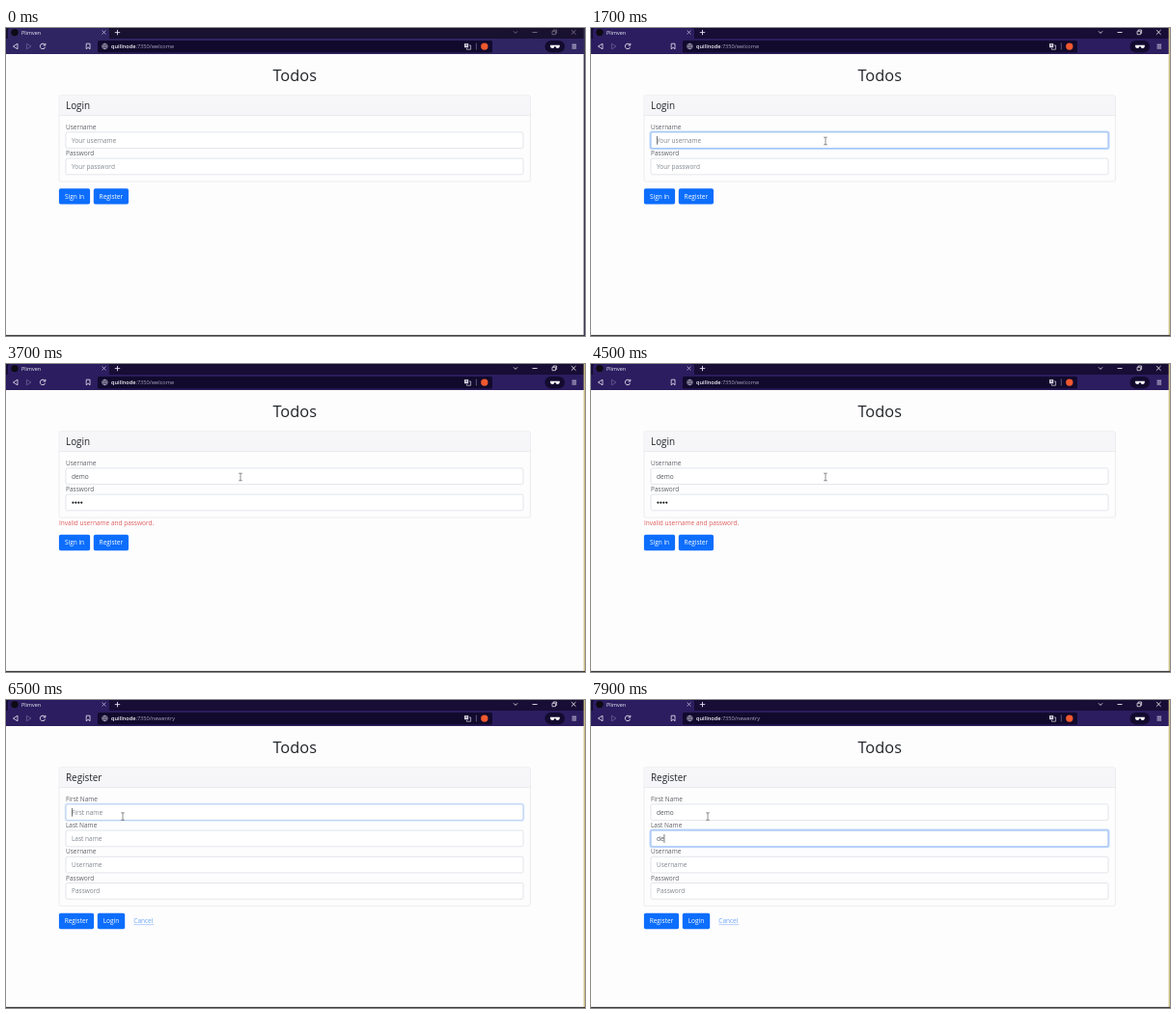
Write an HTML page that moves like this. It is 600 by 319 pixels and loops after 8000 ms.

```html
<!DOCTYPE html>
<html lang="en">
<head>
<meta charset="utf-8">
<title>Sign in and register</title>
<style>
html, body { margin: 0; width: 100%; height: 100%; overflow: hidden; background: #fefdfe; }
svg { display: block; width: 600px; height: 319px; }
text { font-family: "Open Sans", "Noto Sans", sans-serif; font-size: 6.5px; white-space: pre; }
</style>
</head>
<body>
<svg id="stage" viewBox="0 0 600 319" width="600" height="319"></svg>
<script>
const LOOP = 8000, STEP = 100;
const stage = document.getElementById('stage');

function el(parent, tag, attrs, content) {
  const node = document.createElementNS('http://www.w3.org/2000/svg', tag);
  set(node, attrs);
  if (content !== undefined) node.textContent = content;
  parent.appendChild(node);
  return node;
}
function set(node, attrs) {
  for (const k in attrs) node.setAttribute(k, attrs[k]);
}
const rect = (p, x, y, width, height, fill, more) => el(p, 'rect', { x, y, width, height, fill, ...more });
const label = (p, x, y, str, fill, more) => el(p, 'text', { x, y, fill, ...more }, str);
const line = (p, d, stroke, w = 0.8, more) =>
  el(p, 'path', { d, stroke, 'stroke-width': w, fill: 'none', ...more });
const show = (node, on) => node.setAttribute('visibility', on ? 'visible' : 'hidden');
const clamp = v => Math.max(0, Math.min(1, v));

// Browser window
rect(stage, 0, 0, 600, 319, '#fefdfe');
const titleBar = rect(stage, 0, 0, 600, 12, '#180f33');
const tab = el(stage, 'path', { d: 'M2 12V2Q2 0 4 0H105Q107 0 107 2V12Z' });
const toolbar = rect(stage, 0, 11, 600, 16, '#2d2060');
el(stage, 'circle', { cx: 9, cy: 4.6, r: 3.7, fill: '#0d0b14' });
label(stage, 16, 6.6, 'Plimven', '#f1eff8', { style: 'font-size:5.4px;font-weight:500' });
line(stage, 'M99.6 2.6l3.8 3.8m0-3.8l-3.8 3.8', '#d8d4ea', 0.7);
line(stage, 'M115.5 1.9v5.4M112.8 4.6h5.4', '#e4e0f2', 0.9);

const controls = el(stage, 'g', {});
line(controls, 'M526 3.4l2 2 2-2', '#fff', 0.8);
line(controls, 'M545.5 4.5h5', '#fff', 0.8);
line(controls, 'M566 3.3h3.4v3.4H566zM567.2 3.2V2h3.4v3.4h-1', '#fff', 0.7);
line(controls, 'M585.9 2.1l4.6 4.6m0-4.6l-4.6 4.6', '#fff', 0.8);

line(stage, 'M12 16.2v5.6L7.4 19z', '#ece9f6', 0.8, { 'stroke-linejoin': 'round' });
line(stage, 'M21.4 16.2v5.6L26 19z', '#6b5f99', 0.8, { 'stroke-linejoin': 'round' });
line(stage, 'M40.2 17.3A2.7 2.7 0 1 0 40.6 19.8M40.8 15.8v2.2h-2.2', '#ece9f6', 0.9);
line(stage, 'M83.2 16.2h3.8v5.6l-1.9-1.6-1.9 1.6z', '#ece9f6', 0.8);

rect(stage, 95, 13, 409, 12.6, '#120a2d', { rx: 1.6 });
line(stage, 'M99.6 19a2.8 2.8 0 1 0 5.6 0a2.8 2.8 0 1 0-5.6 0h5.6M102.4 16.2q-2.4 2.8 0 5.6q2.4-2.8 0-5.6', '#cfcbdd', 0.6);
const address = label(stage, 109, 21.2, '', '#f4f2fa', { style: 'font-size:5.6px' });
el(address, 'tspan', { 'font-weight': 600 }, 'quillnode');
const path = el(address, 'tspan', { fill: '#aaa5bd' });

rect(stage, 475, 16, 4.2, 4.2, '#d9d6e4', { rx: 0.5 });
line(stage, 'M480 18h1.6v4.2h-4.2v-1.4', '#d9d6e4', 0.7);
line(stage, 'M476 17.2h2.2M477.1 17v2.2', '#2a2145', 0.5);
line(stage, 'M487.3 15.5v7', '#8d87a5', 0.6);
el(stage, 'circle', { cx: 495.8, cy: 19.1, r: 3.7, fill: '#f0582f' });
rect(stage, 558.5, 13, 20.5, 12.4, '#130b2e', { rx: 6.2 });
el(stage, 'path', { d: 'M564 17.8h9.8v1.1q-.3 2-2.2 2t-2.3-2h-.8q-.3 2-2.3 2t-2.2-2z', fill: '#fff' });
line(stage, 'M586.5 17.2h4.6M586.5 19.1h4.6M586.5 21h4.6', '#f1eff8', 0.8);

const rightEdge = rect(stage, 598.6, 0, 1.4, 319, '#3a3550');
rect(stage, 0, 317.9, 600, 1.1, '#3c3b3e');

label(stage, 299.2, 54.7, 'Todos', '#212529',
  { 'text-anchor': 'middle', style: 'font-size:16.4px;font-weight:500' });

// Form pages
const LEFT = 62, FIELD_W = 474, FIELD_H = 16.7, PITCH = 27.2;

function makeField(parent, i, name, hint, spec = {}) {
  const y = 107.9 + i * PITCH, base = y + 10.6;
  label(parent, LEFT, y - 2.9, name, '#5d6165');
  const ring = rect(parent, LEFT - 1.5, y - 1.5, FIELD_W + 3, FIELD_H + 3, '#c2dafd', { rx: 2.6 });
  rect(parent, LEFT, y, FIELD_W, FIELD_H, '#fff', { rx: 1.7, stroke: '#cfd4da', 'stroke-width': 0.6 });
  const edge = rect(parent, LEFT, y, FIELD_W, FIELD_H, 'none', { rx: 1.7, stroke: '#86b7fe', 'stroke-width': 0.7 });
  const hintText = label(parent, 68, base, hint, '#80868c');
  const value = label(parent, 68, base, '', '#50565c');
  const dots = spec.secret ? [0, 1, 2, 3].map(n =>
    el(parent, 'circle', { cx: 69.4 + n * 2.95, cy: y + 8.5, r: 1.1, fill: '#15181b' })) : null;
  const caret = rect(parent, 68, y + 4, 0.6, 8.8, '#222');
  const on = spec.on ?? Infinity, off = spec.off ?? Infinity, keys = spec.keys || [];

  function update(t) {
    const glow = clamp((t - on) / 150) - clamp((t - off) / 150);
    set(ring, { opacity: glow });
    set(edge, { opacity: clamp(glow * 2) });
    const pressed = keys.filter(k => k <= t), n = pressed.length;
    show(hintText, n === 0);
    let end = 68;
    if (dots) {
      dots.forEach((d, k) => show(d, k < n));
      end += n * 2.95;
    } else {
      value.textContent = 'demo'.slice(0, n);
      if (n) end += value.getComputedTextLength();
    }
    const since = t - (n ? pressed[n - 1] : on);
    set(caret, { x: end, opacity: t >= on && t < off && since % 1000 < 500 ? 1 : 0 });
  }
  return { update, hit: (x, py) => x >= LEFT && x <= LEFT + FIELD_W && py >= y && py <= y + FIELD_H };
}

function makeButton(parent, x, w, str) {
  const ring = rect(parent, x - 1.6, -1.6, w + 3.2, 19.6, '#9ec5fe', { rx: 3, opacity: 0 });
  const face = rect(parent, x, 0, w, 16.4, '#0d6efd', { rx: 1.8 });
  label(parent, x + w / 2, 10.6, str, '#fff', { 'text-anchor': 'middle', 'font-weight': 500 });
  return {
    hit: (px, py) => px >= x && px <= x + w && py >= 0 && py <= 16.4,
    update(hover, pressed) {
      set(face, { fill: hover ? '#0b5ed7' : '#0d6efd' });
      set(ring, { opacity: pressed ? 1 : 0 });
    }
  };
}

function makePage(title, bottom, fieldSpecs, buttonSpecs) {
  const g = el(stage, 'g', {});
  rect(g, 55, 69.8, 488.4, bottom - 69.8, '#fefdfe', { rx: 1.8, stroke: '#dfdfe1', 'stroke-width': 0.6 });
  rect(g, 55.3, 70.1, 487.8, 20.4, '#f6f5f7', { rx: 1.6 });
  line(g, 'M55 90.6H543.4', '#dfdfe1', 0.6);
  label(g, LEFT, 84, title, '#212529', { style: 'font-size:9.9px;font-weight:500' });
  const fields = fieldSpecs.map((f, i) => makeField(g, i, ...f));
  const row = el(g, 'g', {});
  const buttons = buttonSpecs.map(b => makeButton(row, ...b));
  return { g, fields, row, buttons };
}

const login = makePage('Login', 159, [
  ['Username', 'Your username', { on: 1350, off: 2450, keys: [1900, 2000, 2200, 2300] }],
  ['Password', 'Your password', { on: 2450, off: 3500, keys: [2600, 2800, 2900, 3000], secret: true }]
], [[54.9, 32.2, 'Sign in'], [90.8, 36.2, 'Register']]);
const error = label(login.g, 54.9, 167.2, 'Invalid username and password.', '#dc5a5a');

const register = makePage('Register', 213.3, [
  ['First Name', 'First name', { on: 6450, off: 7600, keys: [6900, 7000, 7200, 7300] }],
  ['Last Name', 'Last name', { on: 7600, keys: [7800, 7900] }],
  ['Username', 'Username'],
  ['Password', 'Password']
], [[54.9, 36.2, 'Register'], [94.8, 28.4, 'Login']]);
label(register.row, 132.3, 10.6, 'Cancel', '#69a3f7');
line(register.row, 'M132.3 11.8H153.2', '#69a3f7', 0.5);

// Mouse pointer
const pointer = el(stage, 'g', {});
const shapes = {
  beam: line(pointer, 'M-1.8-3.8H-.5Q0-3.8 0-3.2Q0-3.8 .5-3.8H1.8M0-3.4V3.4M-1.8 3.8H-.5Q0 3.8 0 3.2Q0 3.8 .5 3.8H1.8', '#555', 0.65),
  arrow: el(pointer, 'path', { d: 'M0 0V7.6L1.8 6 3 8.6 4.2 8 3 5.5H5.4Z', fill: '#fff', stroke: '#222', 'stroke-width': 0.5 }),
  hand: el(pointer, 'path', {
    d: 'M-.9 .4Q0-.6 .8 .4V3.6Q1.6 3 2.2 3.8Q3 3.4 3.5 4.2Q4.5 3.9 4.7 5V7Q4.5 8.6 3.6 9.8H-.8Q-1.4 8.3-3 6.4Q-3.3 5.3-2.3 5.2L-.9 6.3Z',
    fill: '#fff', stroke: '#222', 'stroke-width': 0.6, 'stroke-linejoin': 'round'
  })
};
const route = [
  [700, 300, 190], [1000, 245, 126], [1200, 243, 117], [4700, 243, 117],
  [4900, 238, 151.5], [5200, 108, 189], [5900, 108, 189], [6300, 121, 120.6]
];
function pointAt(t) {
  let i = 0;
  while (i < route.length - 2 && t > route[i + 1][0]) i++;
  const [ta, xa, ya] = route[i], [tb, xb, yb] = route[i + 1];
  const u = clamp((t - ta) / (tb - ta)), k = u * u * (3 - 2 * u);
  return [xa + (xb - xa) * k, ya + (yb - ya) * k];
}

function draw(t) {
  const active = t >= 300, failed = t >= 3600, second = t >= 5600;
  set(titleBar, { fill: active ? '#170d35' : '#191130' });
  const bar = active ? '#2b1d5f' : '#2f2563';
  set(tab, { fill: bar });
  set(toolbar, { fill: bar });
  set(controls, { opacity: active ? 1 : 0.45 });
  set(rightEdge, { fill: active ? '#cdbd83' : '#3a3550' });
  path.textContent = second ? ':7350/newentry' : ':7350/welcome';

  show(login.g, !second);
  show(register.g, second);
  // Children carry their own visibility, so hide inactive pages by display too.
  login.g.style.display = second ? 'none' : '';
  register.g.style.display = second ? '' : 'none';
  show(error, failed);

  const page = second ? register : login;
  const rowY = second ? 220.8 : failed ? 176.8 : 166.2;
  set(page.row, { transform: `translate(0 ${rowY})` });
  page.fields.forEach(f => f.update(t));

  const [x, y] = pointAt(t);
  let kind = 'arrow';
  if (page.fields.some(f => f.hit(x, y))) kind = 'beam';
  page.buttons.forEach(b => {
    const over = t >= 700 && b.hit(x, y - rowY);
    if (over) kind = 'hand';
    b.update(over, over && t >= 5500);
  });
  pointer.style.display = t >= 700 ? '' : 'none';
  set(pointer, { transform: `translate(${x} ${y})` });
  for (const k in shapes) show(shapes[k], k === kind);
}

function tick() {
  const t = performance.now() % LOOP;
  draw(Math.floor(t / STEP) * STEP);
  requestAnimationFrame(tick);
}
tick();
</script>
</body>
</html>
```
